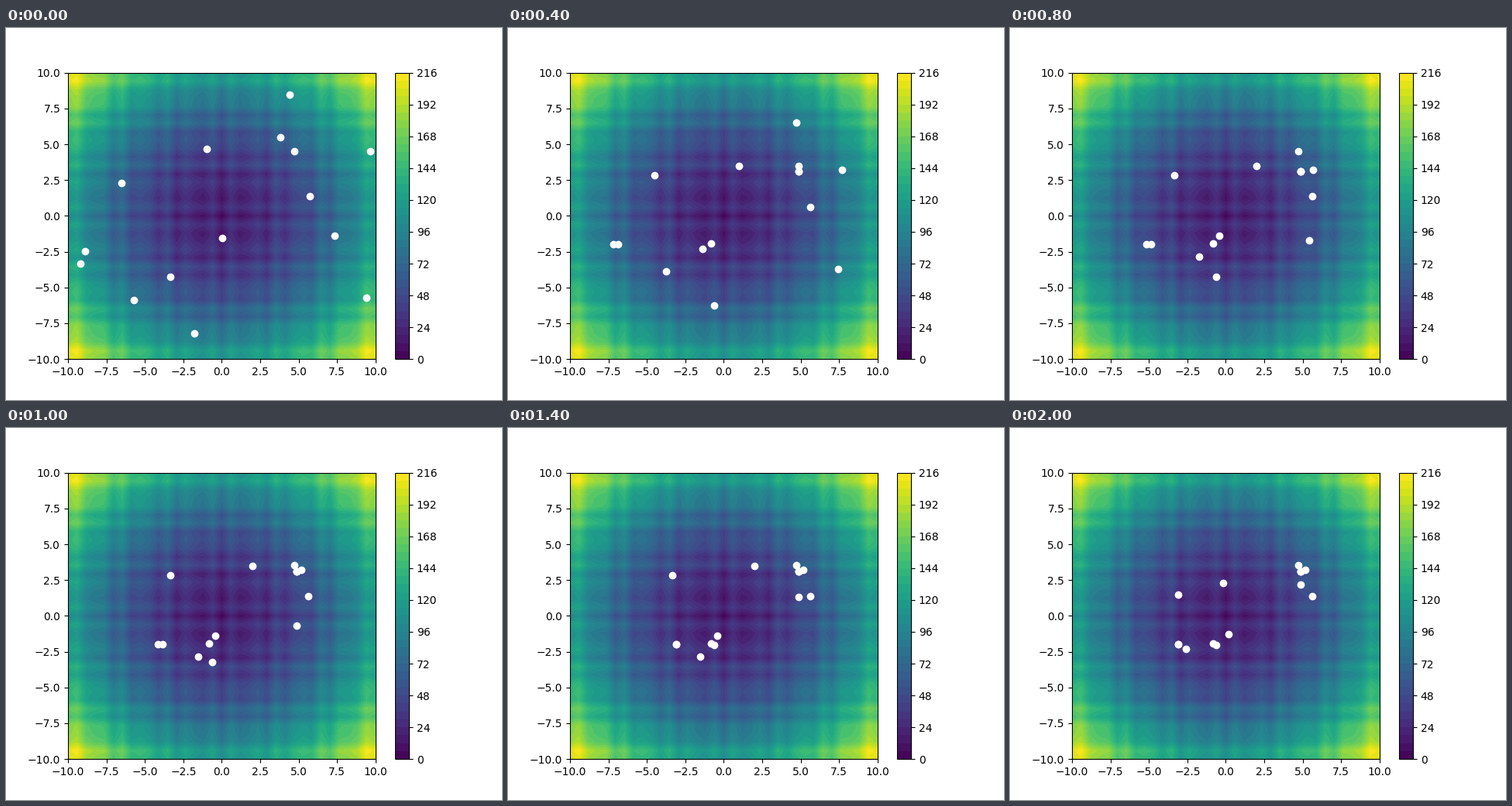
A matplotlib script for the animation above (2100 ms loop, 640x480 px).

```python
import numpy as np
import matplotlib.pyplot as plt
from matplotlib.animation import FuncAnimation

FRAMES, INTERVAL = 21, 100
LIMIT = 10
TOP_SPEED = 0.5     # per axis and frame
TURN = 15           # step at which a second goal takes over

# Resting places shared by several particles.
EAST = (4.89, 3.08)
WEST = (-3.07, -1.97)

# Start, goal and, for those that move on, a second goal.
SWARM = [
    [(4.44, 8.49), (4.70, 3.52)],
    [(3.79, 5.46), EAST],
    [(4.74, 4.49), EAST],
    [(9.68, 4.49), (5.15, 3.24)],
    [(5.75, 1.35), EAST],
    [(7.36, -1.41), (5.65, 1.40)],
    [(9.43, -5.69), (4.89, 2.20)],
    [(-1.00, 4.65), (2.02, 3.46), (-0.15, 2.27)],
    [(-6.50, 2.27), (-3.37, 2.86), (-3.07, 1.46)],
    [(0.01, -1.57), (-0.85, -1.95)],
    [(-8.87, -2.49), WEST],
    [(-9.17, -3.31), WEST],
    [(-3.37, -4.28), (-0.40, -1.36), (0.16, -1.25)],
    [(-5.74, -5.90), (-1.51, -2.87), (-2.57, -2.28)],
    [(-1.76, -8.23), (-0.60, -2.01)],
]


def rastrigin(x, y):
    return sum(v**2 - 10 * np.cos(2 * np.pi * v) + 10 for v in (x, y))


def fly(start, goal, later=None):
    """Head for the goal with capped speed on each axis, then rest there."""
    path = [np.array(start)]
    for step in range(1, FRAMES):
        aim = later if later and step > TURN else goal
        move = np.clip(aim - path[-1], -TOP_SPEED, TOP_SPEED)
        path.append(path[-1] + move)
    return path


paths = np.array([fly(*points) for points in SWARM])

fig, ax = plt.subplots(figsize=(6.4, 4.8), dpi=100)
grid = np.linspace(-LIMIT, LIMIT, 35)
X, Y = np.meshgrid(grid, grid)
surface = ax.contourf(X, Y, rastrigin(X, Y), levels=np.arange(0, 217, 6))
fig.colorbar(surface)
dots = ax.scatter(*paths[:, 0].T, c="white", zorder=3)
ax.set(xlim=(-LIMIT, LIMIT), ylim=(-LIMIT, LIMIT))


def update(frame):
    dots.set_offsets(paths[:, frame])
    return [dots]


anim = FuncAnimation(fig, update, frames=FRAMES, interval=INTERVAL,
                     repeat=True, repeat_delay=0)
plt.show()
```
